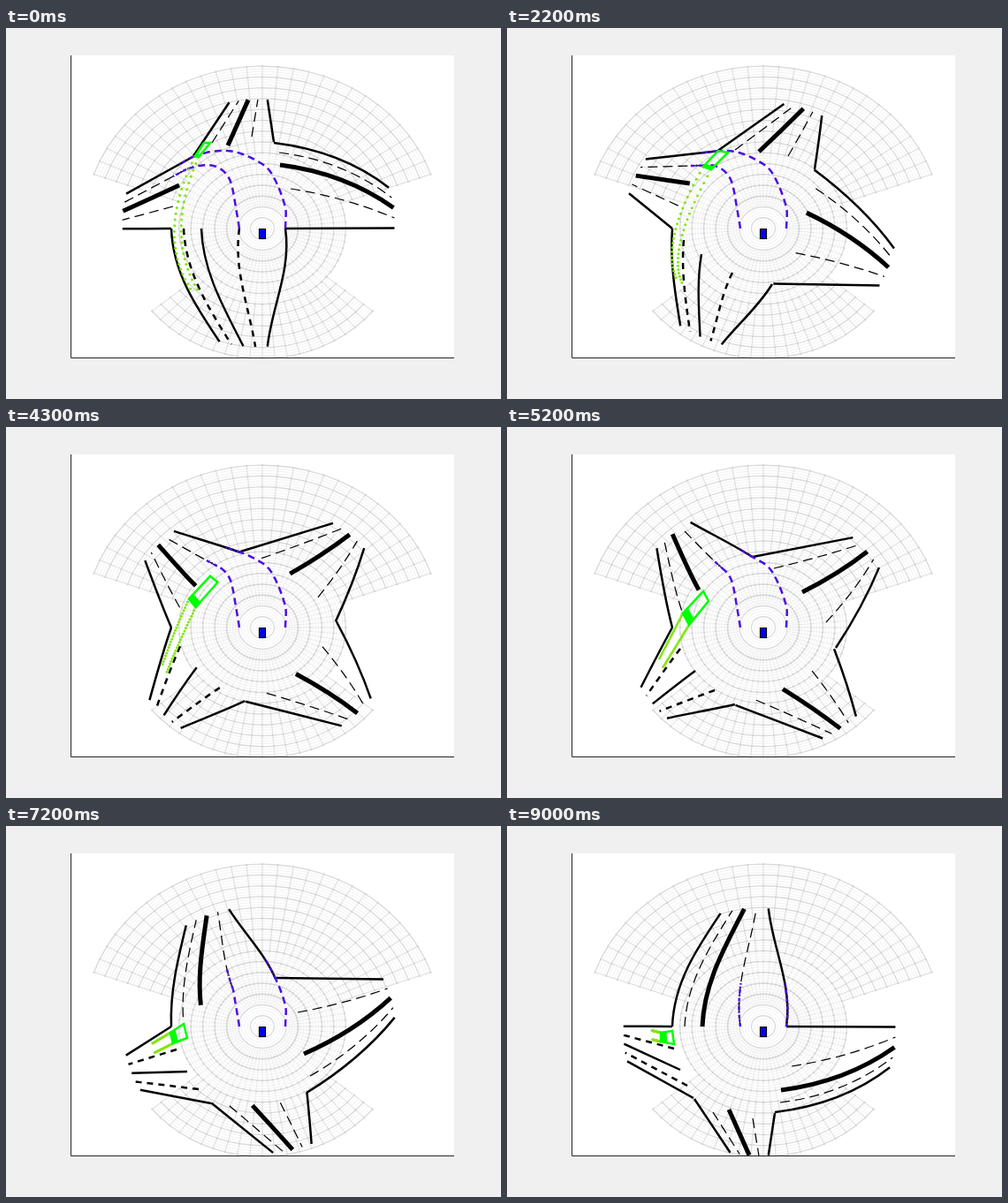
These frames come from a looping animation (560 by 420 pixels, 9100 ms). An HTML page with a canvas:

```html
<!DOCTYPE html>
<html lang="en">
<head>
<meta charset="utf-8">
<title>Turning at a junction</title>
<style>
html, body { margin: 0; width: 100%; height: 100%; overflow: hidden; background: #f0f0f0; }
canvas { display: block; }
</style>
</head>
<body>
<canvas id="stage" width="560" height="420"></canvas>
<script>
const ctx = document.getElementById('stage').getContext('2d');
const END = 9, STEP = 100, LOOP = 9100;
const CX = 290, CY = 227, AX = 1.1;
const RAD = Math.PI / 180;

// Key times in seconds; each track holds x and y at those times.
const KEYS = [0, 0.7, 2.2, 3.4, 5.2, 7.2, 9];
const track = (x, y) => ({ x, y });

const still = track(Array(7).fill(187), Array(7).fill(227));
const nearCorner = track([316, 316, 300, 283, 258, 232, 211], [227, 251, 290, 304, 314, 314, 308]);
const southStart = [
  still,
  track([201, 201, 200, 198, 196, 193, 189], [227, 231, 240, 245, 251, 253, 252]),
  track([221, 221, 220, 218, 213, 205, 196], [227, 237, 256, 267, 276, 278, 276]),
  track([264, 261, 255, 248, 235, 218, 204], [227, 245, 277, 290, 298, 298, 294]),
  nearCorner
];
const northStart = [
  track([212, 220, 237, 253, 278, 306, 316], [145, 142, 140, 138, 147, 172, 227]),
  track([233, 240, 258, 276, 302, 330, 322], [130, 135, 138, 142, 160, 211, 272]),
  track([251, 262, 285, 305, 334, 337, 310], [133, 133, 140, 151, 187, 258, 299]),
  track([278, 289, 318, 339, 361, 344, 309], [123, 132, 145, 167, 221, 283, 313]),
  track([303, 318, 348, 367, 372, 340, 303], [129, 136, 160, 190, 250, 302, 324])
];
// Other car: front pair, then rear pair.
const carCorners = [
  track([214, 219, 222, 215, 199, 186, 174], [145, 146, 157, 177, 211, 234, 234]),
  track([218, 224, 231, 223, 206, 189, 174], [146, 148, 160, 182, 224, 246, 244]),
  track([231, 240, 250, 249, 228, 205, 189], [130, 132, 141, 156, 197, 240, 247]),
  track([224, 236, 239, 238, 222, 201, 187], [130, 132, 139, 153, 186, 224, 232])
];

const mix = (a, b, k) => a + (b - a) * k;
const mixPt = (p, q, k) => [mix(p[0], q[0], k), mix(p[1], q[1], k)];
const flip = p => [p[0], 2 * CY - p[1]];
const clamp01 = v => Math.max(0, Math.min(1, v));

function slope(v, i) {
  const a = Math.max(0, i - 1), b = Math.min(KEYS.length - 1, i + 1);
  return (v[b] - v[a]) / (KEYS[b] - KEYS[a]);
}

function ease(v, t) {
  let i = 0;
  while (i < KEYS.length - 2 && t > KEYS[i + 1]) i++;
  const h = KEYS[i + 1] - KEYS[i], u = (t - KEYS[i]) / h;
  const u2 = u * u, u3 = u2 * u;
  return v[i] * (2 * u3 - 3 * u2 + 1) + v[i + 1] * (3 * u2 - 2 * u3)
    + h * slope(v, i) * (u3 - 2 * u2 + u) + h * slope(v, i + 1) * (u3 - u2);
}

const at = (tr, t) => [ease(tr.x, t), ease(tr.y, t)];

// Outer road ends slide on an ellipse around the junction.
function rim(deg, s) {
  const a = deg * RAD;
  return [285.6 + 5 * s * (1 - s) + 140 * AX * Math.cos(a), 221 + 12 * s + 140 * Math.sin(a)];
}

function bent(p, q, k1, k2) {
  const dx = q[0] - p[0], dy = q[1] - p[1], len = Math.hypot(dx, dy) || 1;
  const ctrl = (f, k) => [p[0] + dx * f - dy / len * k, p[1] + dy * f + dx / len * k];
  return [p, ctrl(1 / 3, k1), ctrl(2 / 3, k2), q];
}

function south(t) {
  const s = t / END, mid = 96.4 + 78 * s + 4 * s * (1 - s), gap = mix(5.1, 4.1, s);
  const k1 = [18, 17, 15, 13, -14], k2 = [9, 8, 6, 1, 2], w = Math.pow(1 - s, 4);
  return southStart.map((tr, i) =>
    bent(at(tr, t), rim(mid + (2 - i) * gap, s), k1[i] * w, k2[i] * w));
}

function north(t) {
  const s = t / END, mid = 265.7 + 101.5 * s - 11 * s * (1 - s), gap = mix(4.05, 4.75, s);
  const k1 = [0, 5, 11, 12, 12], k2 = [0, 5, 12, 13, 14], w = Math.pow(s, 2.5);
  return northStart.map((tr, i) =>
    bent(at(tr, t), rim(mid + (i - 2) * gap, s), k1[i] * w, k2[i] * w));
}

const mirrored = arm => arm.map(line => line.map(flip));

function along(b, u) {
  const v = 1 - u, w = [v * v * v, 3 * v * v * u, 3 * v * u * u, u * u * u];
  return [0, 1].map(k => w.reduce((sum, c, i) => sum + c * b[i][k], 0));
}

function stroke(color, width, dash = []) {
  ctx.strokeStyle = color;
  ctx.lineWidth = width;
  ctx.setLineDash(dash);
  ctx.stroke();
}

function trace(pts) {
  ctx.beginPath();
  pts.forEach(p => ctx.lineTo(p[0], p[1]));
}

function drawArm(arm, marked) {
  const edge = [2.5, []], thin = [1.25, [11, 6]], bold = [2.5, [7, 6]];
  const side = marked ? bold : thin;
  const styles = [edge, side, marked ? [2.4, []] : [5, []], side, edge];
  arm.forEach((b, i) => {
    ctx.beginPath();
    ctx.moveTo(...b[0]);
    ctx.bezierCurveTo(...b[1], ...b[2], ...b[3]);
    stroke('#000', ...styles[i]);
  });
}

function drawLane(t, west) {
  const s = t / END, reach = 0.22 + 0.14 * Math.pow(s, 4);
  [3, 4].forEach(i => {
    const pts = [], ahead = [];
    for (let k = 0; k <= 50; k++) pts.push(flip(at(southStart[i], (END - t) * k / 50)));
    for (let k = 0; k <= 12; k++) ahead.push(along(west[i], reach * k / 12));
    if (t < END) {
      trace(pts);
      stroke('#4b0fe0', 2.5, [8, 5]);
    }
    trace(ahead);
    stroke('#4b0fe0', 2.5, [4, 2, 1.5, 2]);
  });
}

function drawCar(t, arm) {
  const s = t / END, c = carCorners.map(tr => at(tr, t));
  const f = mix(0.5, 0.42, s), blend = clamp01((s - 0.38) / 0.18);
  ctx.fillStyle = '#80e60a';
  [0.25, 0.8].forEach((lat, n) => {
    const p = c[n];
    const end = mixPt(along(arm[0], f), along(arm[1], f), lat);
    const mid = mixPt(mixPt(arm[0][0], arm[1][0], lat), mixPt(p, end, 0.5), blend);
    const ctl = [0, 1].map(k => 2 * mid[k] - (p[k] + end[k]) / 2);
    for (let k = 0; k < 24; k++) {
      const u = k / 23, q = mixPt(mixPt(p, ctl, u), mixPt(ctl, end, u), u);
      ctx.beginPath();
      ctx.arc(q[0], q[1], 1.5, 0, 7);
      ctx.fill();
    }
  });
  trace(c);
  ctx.closePath();
  stroke('#00ff00', 2.5);
  const nose = 0.12 + 0.3 * s * s;
  trace([c[0], c[1], mixPt(c[1], c[2], nose), mixPt(c[0], c[3], nose)]);
  ctx.closePath();
  ctx.fillStyle = '#00ff00';
  ctx.fill();
  stroke('#00ff00', 2);
}

// Sensor grid: full disc, wide front fan and narrower rear fan.
const RING = 12.25;
const fans = [
  { from: 0, to: 360, inner: 0, outer: 7 },
  { from: 199.5, to: 340.5, inner: 7, outer: 15 },
  { from: 39.5, to: 140.5, inner: 7, outer: 12 }
];

function polar(r, deg) {
  return [CX + AX * r * Math.cos(deg * RAD), CY + r * Math.sin(deg * RAD)];
}

function arc(fan, r) {
  ctx.beginPath();
  ctx.ellipse(CX, CY, r * AX, r, 0, fan.from * RAD, fan.to * RAD);
}

function drawGrid() {
  fans.forEach(fan => {
    for (let i = fan.inner * 4 + 1; i <= fan.outer * 4; i++) {
      const main = i % 4 === 0;
      arc(fan, i * RING / 4);
      stroke(main ? '#dadada' : '#ececec', main ? 1.3 : 0.7);
    }
    const count = Math.round((fan.to - fan.from) / 5);
    for (let k = 0; k <= count; k++) {
      const deg = mix(fan.from, fan.to, k / count);
      trace([polar(Math.max(fan.inner, 2) * RING, deg), polar(fan.outer * RING, deg)]);
      stroke(fan.inner ? '#dcdcdc' : '#e8e8e8', fan.inner ? 1 : 0.7);
      ctx.fillStyle = '#d6d6d6';
      for (let i = Math.max(fan.inner, 3); i <= fan.outer; i++) {
        const p = polar(i * RING, deg);
        ctx.beginPath();
        ctx.arc(p[0], p[1], 1.2, 0, 7);
        ctx.fill();
      }
    }
  });
}

function draw(t) {
  ctx.fillStyle = '#f0f0f0';
  ctx.fillRect(0, 0, 560, 420);
  ctx.fillStyle = '#fff';
  ctx.fillRect(73, 31, 434, 343);
  ctx.save();
  ctx.beginPath();
  ctx.rect(73, 31, 434, 344);
  ctx.clip();
  drawGrid();
  const s = south(t), w = mirrored(south(END - t));
  drawArm(s, true);
  [w, north(t), mirrored(north(END - t))].forEach(arm => drawArm(arm, false));
  drawLane(t, w);
  drawCar(t, s);
  ctx.restore();
  ctx.beginPath();
  ctx.rect(286.5, 227.5, 7, 11);
  ctx.fillStyle = '#0000f0';
  ctx.fill();
  stroke('#000', 1.2);
  trace([[73.5, 31], [73.5, 373.5], [507, 373.5]]);
  stroke('#262626', 1);
}

let start = null, last = -1;
function tick(now) {
  if (start === null) start = now;
  const n = Math.floor(((now - start) % LOOP) / STEP);
  if (n !== last) draw((last = n) * STEP / 1000);
  requestAnimationFrame(tick);
}
draw(0);
requestAnimationFrame(tick);
</script>
</body>
</html>
```
